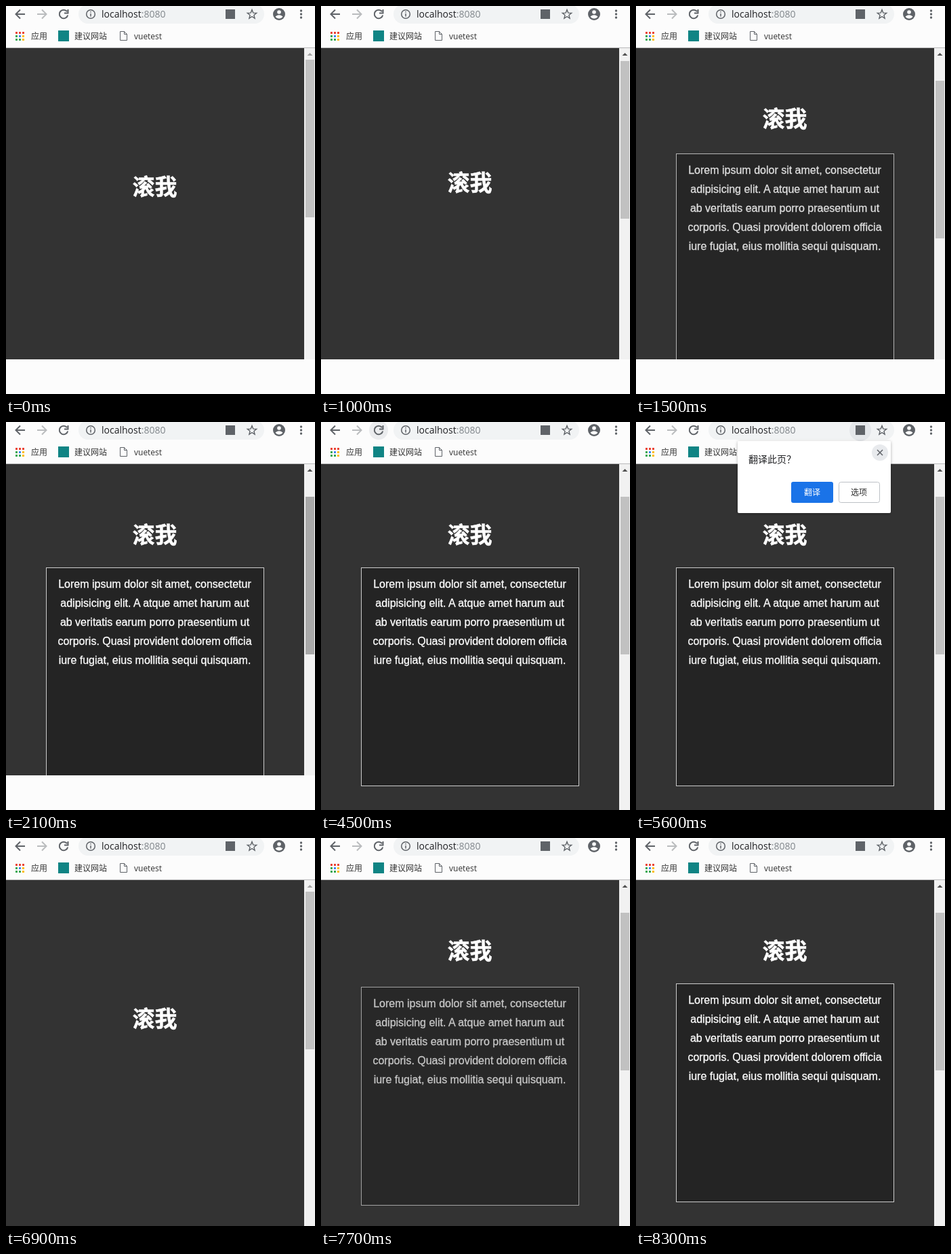
Recreate the animation shown at these times as an HTML page. Size 456 px wide and 571 px high, loop 9200 ms.

```html
<!DOCTYPE html>
<html lang="zh-CN">
<head>
<meta charset="utf-8">
<title>Scroll reveal</title>
<style>
  html, body { margin: 0; width: 100%; height: 100%; overflow: hidden; background: #fcfcfc; }
  svg { display: block; }
  .ui { font-family: "Open Sans", "Noto Sans CJK SC", sans-serif; font-size: 12px; fill: #333; }
  .url { font-size: 14px; fill: #202124; }
  .heading { font: bold 33px "Noto Sans CJK SC", sans-serif; fill: #fff; stroke: #fff; stroke-width: .5; text-anchor: middle; }
  .copy { font: 16px "Liberation Sans", Arial, sans-serif; fill: #fff; stroke: #fff; stroke-width: .3; text-anchor: middle; }
  .icon { fill: none; stroke: #5f6368; stroke-width: 2; }
</style>
</head>
<body>
<svg width="456" height="571" viewBox="0 0 456 571">
  <defs>
    <clipPath id="page"><rect y="62" width="440" height="509"/></clipPath>
    <filter id="shadow" x="-10%" y="-10%" width="120%" height="125%">
      <feDropShadow dx="0" dy="1" stdDeviation="2" flood-opacity=".3"/>
    </filter>
  </defs>

  <!-- Page -->
  <rect y="62" width="440" height="509" fill="#333"/>
  <g clip-path="url(#page)">
    <g id="content">
      <text class="heading" x="219.500" y="278">滚我</text>
      <g id="box">
        <rect x="59.5" y="314.5" width="321" height="321" fill="#242424" stroke="#ccc"/>
        <g id="copy" class="copy"></g>
      </g>
    </g>
  </g>

  <!-- Scrollbar -->
  <rect x="440" y="62" width="16" height="509" fill="#f1f1f1"/>
  <path id="arrow" d="M444.500 73l4-4 4 4z"/>
  <rect id="thumb" x="442" width="13" height="232"/>
  <rect id="blank" y="520" width="456" height="51" fill="#fcfcfc"/>

  <!-- Toolbar -->
  <rect width="456" height="61" fill="#fcfcfc"/>
  <rect y="61" width="456" height="1" fill="#b8b8ba"/>
  <rect x="107" y="-2" width="274" height="28" rx="14" fill="#f1f3f4"/>
  <circle id="reloadHover" cx="85" cy="12" r="14" fill="#ebecee"/>
  <g class="icon">
    <path d="M28 12H15M21 5.5L14.500 12l6.500 6.500"/>
    <path d="M46 12h13M53 5.500l6.500 6.500-6.500 6.500" stroke="#babcbe"/>
    <path id="reload" d="M90 8a6.300 6.300 0 1 0 1.200 5.500M91.500 5v5.500H86"/>
    <path id="stop" d="M79.500 6.500l11 11m0-11l-11 11" stroke="#b4b6b8" stroke-width="1.500"/>
    <g stroke-width="1.500">
      <circle cx="125" cy="12" r="6.300"/>
      <path d="M125 11v4.500M125 8v1.600"/>
      <path id="star" stroke-width="1.400"/>
    </g>
  </g>
  <text class="ui url" x="141" y="17">localhost<tspan fill="#80868b">:8080</tspan></text>
  <circle id="translateHover" cx="331" cy="12" r="16" fill="#e4e7ea"/>
  <rect x="324" y="5" width="14" height="14" fill="#5f6368"/>
  <circle cx="403" cy="12" r="9" fill="#5f6368"/>
  <circle cx="403" cy="9" r="2.800" fill="#fff"/>
  <path d="M397.500 15.500q5.500-4.500 11 0q-2 3-5.500 3t-5.500-3z" fill="#fff"/>
  <path d="M435.500 7v0M435.500 12v0M435.500 17v0" stroke="#5f6368" stroke-width="3.400" stroke-linecap="round"/>

  <!-- Bookmarks -->
  <g id="apps"></g>
  <rect x="77" y="36" width="16" height="16" fill="#0f8484"/>
  <path class="icon" style="stroke-width:1" d="M168.500 37.500h6l4 4v9h-10zM174.500 37.500v4h4"/>
  <g class="ui">
    <text x="37" y="49">应用</text>
    <text x="101" y="49">建议网站</text>
    <text x="189" y="49">vuetest</text>
  </g>

  <!-- Translate popup -->
  <g id="popup" class="ui">
    <rect x="150" y="28" width="226" height="106" rx="2" fill="#fff" filter="url(#shadow)"/>
    <circle id="closeHover" cx="360" cy="45" r="12" fill="#e8eaed"/>
    <path class="icon" style="stroke-width:1.500" d="M356 41l8 8m0-8l-8 8"/>
    <text class="url" x="166" y="60">翻译此页？</text>
    <rect x="229" y="88" width="62" height="31" rx="3" fill="#1a73e8"/>
    <text x="248" y="108" style="fill:#fff">翻译</text>
    <rect x="299.500" y="88.500" width="60" height="30" rx="3" fill="none" stroke="#bdc1c6"/>
    <text x="317" y="108">选项</text>
  </g>
</svg>
<script>
const LOOP = 9200, STEP = 100;
const el = id => document.getElementById(id);
const set = (id, name, value) => el(id).setAttribute(name, value);
const show = (id, opacity) => set(id, 'opacity', Number(opacity));
const clamp = x => Math.min(1, Math.max(0, x));
const ramp = (t, start, length) => clamp((t - start) / length);
const within = (t, from, to) => t >= from && t < to;
const smooth = x => x * x * (3 - 2 * x);

// cubic-bezier(.5, 0, 0, 1)
function revealEase(x) {
  let low = 0, high = 1;
  for (let i = 0; i < 24; i++) {
    const s = (low + high) / 2;
    if (1.5 * s * (1 - s) ** 2 + s ** 3 < x) low = s; else high = s;
  }
  return smooth(high);
}

el('copy').innerHTML = [
  'Lorem ipsum dolor sit amet, consectetur',
  'adipisicing elit. A atque amet harum aut',
  'ab veritatis earum porro praesentium ut',
  'corporis. Quasi provident dolorem officia',
  'iure fugiat, eius mollitia sequi quisquam.'
].map((line, i) => `<text x="219.5" y="${344 + 28 * i}">${line}</text>`).join('');

const [red, green, blue, yellow] = ['#ea4335', '#34a853', '#4285f4', '#fbbc05'];
el('apps').innerHTML = [red, red, red, green, blue, yellow, green, green, yellow]
  .map((color, i) => `<rect x="${14 + i % 3 * 5}" y="${38 + Math.floor(i / 3) * 5}" width="3" height="3" fill="${color}"/>`)
  .join('');

set('star', 'd', 'M' + Array.from({ length: 10 }, (_, i) => {
  const angle = i * Math.PI / 5, radius = i % 2 ? 3 : 7;
  return `${(363 + radius * Math.sin(angle)).toFixed(1)} ${(12.5 - radius * Math.cos(angle)).toFixed(1)}`;
}).join('L') + 'z');

function thumbColor(t) {
  if (within(t, 2000, 3200)) return '#a8a8a8';
  return within(t, 6600, 6900) ? '#787878' : '#c1c1c1';
}

function draw(t) {
  const scroll = Math.round(100 * smooth(ramp(t, t < 6600 ? 955 : 7255, 300)));
  const revealStart = t < 4800 ? 1000 : t < 6600 ? 4800 : 7300;
  const reveal = revealEase(ramp(t, revealStart, 1000));

  set('content', 'transform', `translate(0 ${-scroll})`);
  set('box', 'transform', `translate(0 ${Math.round(20 * (1 - reveal))})`);
  show('box', reveal);
  set('thumb', 'y', 79 + Math.round(scroll * 0.31));
  set('thumb', 'fill', thumbColor(t));
  set('arrow', 'fill', scroll ? '#505050' : '#a3a3a3');
  show('blank', t < 3200);

  const loading = within(t, 4800, 5300);
  show('stop', loading);
  show('reload', !loading);
  show('reloadHover', t < 5400 ? ramp(t, 4300, 200) : 0);
  show('translateHover', t < 5000 ? 0 : 1 - ramp(t, 6200, 200));
  show('popup', t < 6000 ? ramp(t, 4945, 200) : 0);
  show('closeHover', within(t, 5600, 6000));
}

function tick() {
  const t = performance.now() % LOOP;
  draw(Math.floor(t / STEP) * STEP);
  requestAnimationFrame(tick);
}
tick();
</script>
</body>
</html>
```
